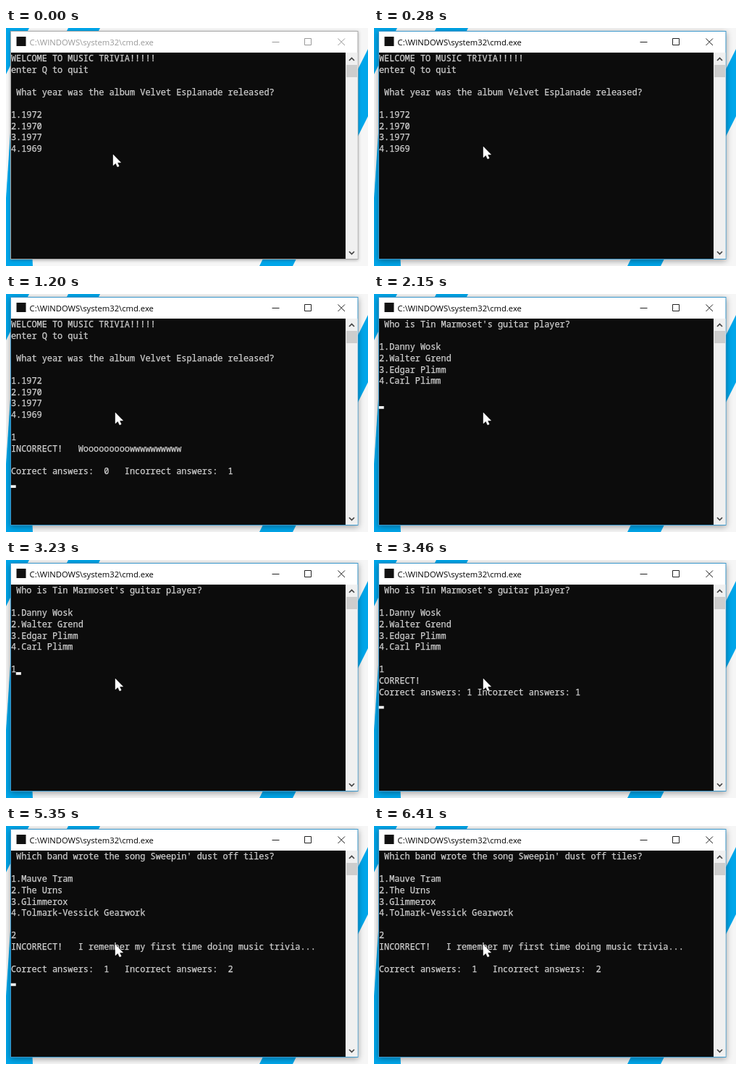
Recreate the animation shown at these times as an HTML page. Size 500 by 329 pixels, loop 6.67 s.

```html
<!DOCTYPE html>
<html lang="en">
<head>
<meta charset="utf-8">
<title>Music trivia</title>
<style>
  html, body { margin: 0; width: 100%; height: 100%; overflow: hidden; background: #f6f6f6; }
  svg { display: block; width: 500px; height: 329px; }
  text { white-space: pre; }
  #rows { font: 11.9px "Noto Sans Mono", monospace; fill: #d0d0d0; stroke: #d0d0d0; stroke-width: .25; }
  #title { font: 11.23px "Open Sans", "Noto Sans", sans-serif; fill: #000; }
  #frame { fill: #fff; stroke: #3c98cc; filter: drop-shadow(0 2px 4px rgba(0, 0, 0, .36)); }
  #buttons { fill: none; stroke: #222; }
  .idle #title { fill: #999; }
  .idle #frame { stroke: #aaa; filter: drop-shadow(0 1px 2px rgba(0, 0, 0, .3)); }
  .idle #buttons { stroke: #999; }
</style>
</head>
<body>
<svg id="stage" class="idle" viewBox="0 0 500 329">
  <g fill="#00a6ea">
    <path d="M0 0H32L0 64Z"/>
    <path d="M86 0H130L120 20H76Z"/>
    <path d="M7 130L0 235V329H37L36 310Z"/>
    <path d="M350 329L500 29V122L396 329Z"/>
  </g>
  <rect id="frame" x="6.5" y="4.5" width="479.5" height="315"/>
  <rect x="14.5" y="12" width="13" height="13" fill="#111"/>
  <text id="title" x="32.6" y="23.6">C:\WINDOWS\system32\cmd.exe</text>
  <path id="buttons" d="M367.5 19.5h10M412.5 14.5h9v9h-9zM458.5 14.5l9.5 9.5m0-9.5l-9.5 9.5"/>
  <path fill="#0c0c0c" d="M7 34H469V319H7Z"/>
  <path fill="#f0f0f0" d="M469 34H485.5V319H469Z"/>
  <path fill="#cdcdcd" d="M470 51H485V68H470Z"/>
  <path fill="none" stroke="#444" stroke-width="1.7" d="M474 45l3.5-3.5L481 45M474 309l3.5 3.5L481 309"/>
  <g id="rows"></g>
  <rect id="caret" width="7.1" height="3.8" fill="#f2f2f2"/>
  <path id="mouse" fill="#fff" stroke="#fff" stroke-width=".4" d="M0 0V15.1L3.5 11.9L5.9 17L8.2 16L5.9 11H10.7Z"/>
</svg>
<script>
const LOOP = 6670, LEFT = 6.9, BASE = 46.2, ROW = 15.6, COL = 7.14;
const $ = id => document.getElementById(id);

const album = [
  "WELCOME TO MUSIC TRIVIA!!!!!", "enter Q to quit", "",
  " What year was the album Velvet Esplanade released?", "",
  "1.1972", "2.1970", "3.1977", "4.1969", ""
];
const guitar = [
  " Who is Tin Marmoset's guitar player?", "",
  "1.Danny Wosk", "2.Walter Grend", "3.Edgar Plimm", "4.Carl Plimm", ""
];
const song = [
  " Which band wrote the song Sweepin' dust off tiles?", "",
  "1.Mauve Tram", "2.The Urns", "3.Glimmerox", "4.Tolmark-Vessick Gearwork", ""
];
const wrong1 = [...album, "1", "INCORRECT!   W" + "o".repeat(9) + "w".repeat(10)];
const score1 = [...wrong1, "", "Correct answers:  0   Incorrect answers:  1"];
const score2 = [...guitar, "1", "CORRECT!", "Correct answers: 1 Incorrect answers: 1"];
const score3 = [...song, "2", "INCORRECT!   I remember my first time doing music trivia...",
  "", "Correct answers:  1   Incorrect answers:  2"];

// time, lines, caret [column, row]
const screens = [
  [0, album],
  [590, album, [0, 10]],
  [1060, [...album, "1"], [1, 10]],
  [1130, wrong1, [0, 12]],
  [1200, score1, [0, 14]],
  [2150, guitar, [0, 7]],
  [2680, guitar],
  [3230, [...guitar, "1"], [1, 7]],
  [3460, score2, [0, 10]],
  [4170, song, [0, 7]],
  [4800, song],
  [5100, [...song, "2"], [1, 7]],
  [5350, score3, [0, 11]],
  [6410, score3]
];

// time, x, y, window focused
const pointer = [
  [0, 148, 175, false],
  [70, 149, 171, false],
  [140, 150, 167, false],
  [210, 151, 164, false],
  [280, 151, 164, true]
];

const rows = Array.from({ length: 15 }, (_, i) => {
  const row = document.createElementNS("http://www.w3.org/2000/svg", "text");
  row.setAttribute("x", LEFT);
  row.setAttribute("y", BASE + i * ROW);
  return $("rows").appendChild(row);
});

const at = (steps, t) => steps.findLast(step => step[0] <= t);
let shown;

function showScreen(screen) {
  if (screen === shown) return;
  shown = screen;
  const [, lines, caret] = screen;
  rows.forEach((row, i) => row.textContent = lines[i] || "");
  $("caret").style.display = caret ? "" : "none";
  if (caret) {
    $("caret").setAttribute("x", LEFT - 0.3 + caret[0] * COL);
    $("caret").setAttribute("y", BASE - 0.4 + caret[1] * ROW);
  }
}

function draw(t) {
  showScreen(at(screens, t));
  const [, x, y, focused] = at(pointer, t);
  $("mouse").setAttribute("transform", `translate(${x} ${y})`);
  $("stage").classList.toggle("idle", !focused);
}

const start = performance.now();
function tick() {
  draw((performance.now() - start) % LOOP);
  requestAnimationFrame(tick);
}
tick();
</script>
</body>
</html>
```
